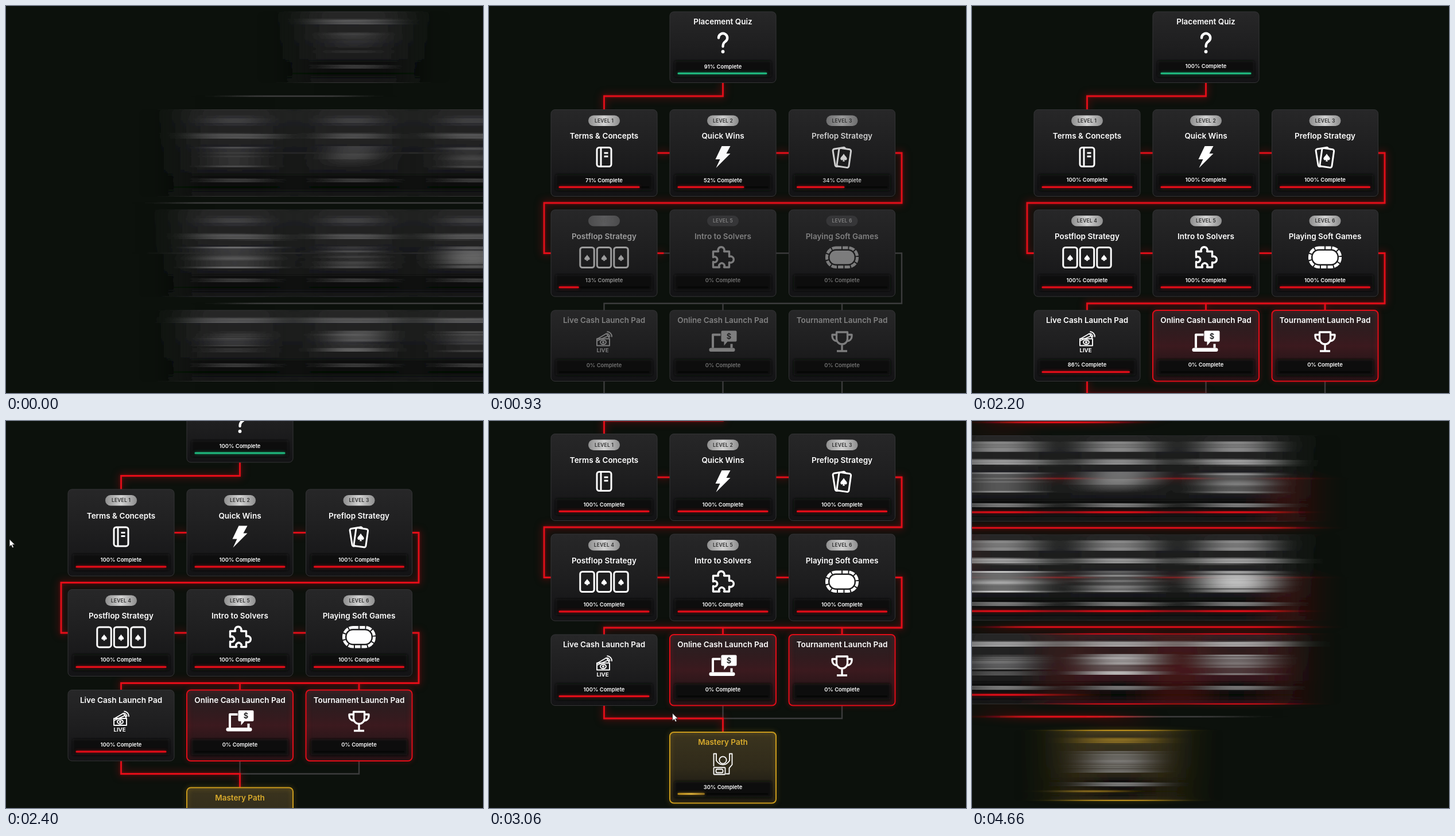
Recreate the animation shown at these times as an HTML page. Size 831x674 px, loop 4.73 s.

```html
<!DOCTYPE html>
<html lang="en">
<head>
<meta charset="utf-8">
<title>Learning path</title>
<style>
html, body { margin: 0; width: 100%; height: 100%; overflow: hidden; background: #0c110c; }
svg { display: block; width: 100vw; height: 100vh; font-family: Inter, sans-serif; font-weight: 600; }
text { text-anchor: middle; fill: #fff; }
.title { font-size: 13.5px; }
.percent { font-size: 9.4px; }
.badge { font-size: 8.5px; letter-spacing: .2px; }
.icon { fill: none; stroke: #fff; stroke-width: 3; stroke-linejoin: round; }
.solid { fill: #fff; stroke: none; }
.dark { fill: #1c1c1d; stroke: none; }
.link { fill: none; stroke: #3c3c3d; stroke-width: 2.4; }
#lit { filter: drop-shadow(0 0 2px #b0081090) drop-shadow(0 0 7px #b80812b0); }
#lit .link { stroke: #e40d18; stroke-width: 2.8; }
</style>
</head>
<body>
<svg id="stage" viewBox="0 0 831 674" preserveAspectRatio="none"></svg>
<script>
const LOOP = 4730;
const RED = '#e00d18', GREEN = '#1fb57c', GOLD = '#c99a1c';
const COLUMNS = [200.5, 407.5, 615];

const spade = (x, y, s) => `<path class="solid" transform="translate(${x} ${y}) scale(${s})"
  d="M0-7C2-3 6-1 6 2.5A3 3 0 0 1 1 4L2 7H-2L-1 4A3 3 0 0 1-6 2.5C-6-1-2-3 0-7Z"/>`;

const icons = {
  question: `<path stroke-width="4.4" stroke-linecap="round" d="M-7.5-9A7.6 7.6 0 1 1 4-2.5C1-.5 0 1.5 0 6"/>
    <circle class="solid" cy="15" r="2.9"/>`,
  book: `<rect x="-12.5" y="-16.5" width="25" height="33" rx="4"/><path d="M-5.5-16V16M0-7H7M0-1H7"/>`,
  bolt: `<path class="solid" d="M-2-19H13L6-6H13L-12 19-5 4H-13Z"/>`,
  pair: `<rect x="-14" y="-16" width="22" height="31" rx="3" transform="rotate(-9)"/>
    <rect x="-7" y="-15" width="21" height="32" rx="3" fill="#1c1c1d" transform="rotate(8)"/>${spade(3, 1, .95)}`,
  flop: [-29.5, 0, 29.5].map(x =>
    `<rect x="${x - 12.2}" y="-17" width="24.4" height="35" rx="4"/>${spade(x, 1, .8)}`).join(''),
  puzzle: `<path stroke-width="3.4" d="M-17-10H-8A5.5 5.5 0 1 1 2-10H11V-1A5.5 5.5 0 1 1 11 9V17.5
    H2A4.7 4.7 0 1 0-6 17.5H-17V8A4.7 4.7 0 1 0-17 0Z"/>`,
  table: `<rect x="-26.5" y="-16.5" width="53" height="33.5" rx="16" stroke-width="5" stroke-dasharray="9.5 2"/>
    <rect class="solid" x="-21.5" y="-11.5" width="43" height="23.5" rx="11"/>`,
  live: `<g stroke-width="1.9"><path d="M-13-4L4-14 9-7"/><path d="M-13-1L7-10 9-6"/>
    <rect x="-12.5" y="-5" width="22" height="12"/><ellipse cx="-1.5" cy="1" rx="5" ry="3.7"/>
    <circle class="solid" cx="-1.5" cy="1" r="2"/><path d="M5-14A6 6 0 0 1 10-8M5-17.5A9 9 0 0 1 13.5-8"/></g>
    <text x="-2.5" y="18.5" font-size="9.6" font-weight="700" stroke="none">LIVE</text>`,
  laptop: `<path stroke-width="4" d="M-4-12H-17.5V11M15 4V11"/>
    <rect class="solid" x="-24" y="11" width="45" height="6.5" rx="3"/>
    <path class="solid" d="M-1-19H22a2 2 0 0 1 2 2V-2a2 2 0 0 1-2 2H8L2 7V0H-1a2 2 0 0 1-2-2V-17a2 2 0 0 1 2-2Z"/>
    <text class="dark" x="10.5" y="-4.5" font-size="13">$</text>`,
  trophy: `<path stroke-width="3.3" d="M-9.5-16.5H9.5V-5A9.5 9.5 0 0 1-9.5-5ZM-10-12H-17V-9
    A8 8 0 0 0-8.5-1M10-12H17V-9A8 8 0 0 1 8.5-1M0 4V16M-9 16.5H9"/>`,
  winner: `<g stroke-width="1.8"><path d="M-16 5V-17H-11.5V-5Q-7 2 0 2T11.5-5V-17H16V2L11 8V18H5"/>
    <circle cy="-6" r="6.2"/><rect x="-16" y="7" width="20" height="12" rx="1"/>
    <rect x="-12" y="10" width="12" height="6" rx="2"/></g>`
};

// start: when the card wakes up; goal: percentage it climbs to
const card = (title, icon, column, top, start, more) =>
  ({ title, icon, x: COLUMNS[column], top, start, goal: 100, height: 123.5, color: RED, ...more });
const level = n => ({ level: n, height: 151 });
const cards = [
  card('Placement Quiz', 'question', 1, 10, 20, { color: GREEN }),
  card('Terms & Concepts', 'book', 0, 180.5, 220, level(1)),
  card('Quick Wins', 'bolt', 1, 180.5, 410, level(2)),
  card('Preflop Strategy', 'pair', 2, 180.5, 590, level(3)),
  card('Postflop Strategy', 'flop', 0, 355, 800, level(4)),
  card('Intro to Solvers', 'puzzle', 1, 355, 960, level(5)),
  card('Playing Soft Games', 'table', 2, 355, 1190, level(6)),
  card('Live Cash Launch Pad', 'live', 0, 530, 1340),
  card('Online Cash Launch Pad', 'laptop', 1, 530, 1340, { goal: 0, frame: 'red' }),
  card('Tournament Launch Pad', 'trophy', 2, 530, 1340, { goal: 0, frame: 'red' }),
  card('Mastery Path', 'winner', 1, 700, 1560, { goal: 30, frame: 'gold', color: GOLD })
];
const mastery = cards[cards.length - 1];

// [path, begin, end]; links without times never light up
const links = [
  ['M407.5 133V157H200.5V181', 60, 220],
  ['M293 256H315', 350, 410],
  ['M500 256H522', 530, 590],
  ['M707 256H719V343H96V430.5H108', 610, 800],
  ['M293 430.5H315', 900, 960],
  ['M500 430.5H522', 1130, 1190],
  ['M707 430.5H719V518H200.5V530', 1210, 1360],
  ['M615 518V530', 1250, 1290],
  ['M407.5 518V530', 1300, 1340],
  ['M407.5 653V700'],
  ['M615 653V676H407.5'],
  ['M200.5 653V676H407.5V700', 1460, 1580]
];

const clamp = v => Math.max(0, Math.min(1, v));
const span = (t, a, b) => clamp((t - a) / (b - a));
const smooth = u => u * u * (3 - 2 * u);
const mix = (a, b, u) => a + (b - a) * u;

const gradient = (id, stops, vertical = 1) =>
  `<linearGradient id="${id}" x2="${1 - vertical}" y2="${vertical}">${stops.map((c, i) =>
    `<stop offset="${i / (stops.length - 1)}" stop-color="${c}"/>`).join('')}</linearGradient>`;

function cardMarkup(c) {
  const { x, top, height: h, level } = c, left = x - 92.5, bottom = top + h;
  const gold = c.frame === 'gold', edge = gold ? GOLD : RED;
  const box = `x="${left}" y="${top}" width="185" height="${h}" rx="7"`;
  return `<g class="card">
    <rect ${box} fill="url(#face)" stroke="#343436"/>
    ${c.frame ? `<g class="frame"><rect ${box} fill="url(#${c.frame})"/>
      <rect ${box} fill="none" stroke="${edge}" stroke-width="2"
        style="filter:drop-shadow(0 0 4px ${edge}90)"/></g>` : ''}
    <rect x="${left + 8}" y="${bottom - 38}" width="169" height="28" rx="3" fill="#0b0e0b" filter="url(#soft)"/>
    <rect x="${x - 79}" y="${bottom - 17.5}" width="158" height="3" rx="1.5" fill="#060706"/>
    <rect class="bar" x="${x - 79}" y="${bottom - 17.7}" height="3.2" rx="1.5"
      fill="${gold ? 'url(#coin)' : c.color}" style="filter:drop-shadow(0 0 2.5px ${c.color}90)"/>
    ${level ? `<rect x="${x - 27.5}" y="${top + 10}" width="55" height="18.5" rx="9.2" fill="#363638"/>
      <rect class="shine" x="${x - 27.5}" y="${top + 10}" width="55" height="18.5" rx="9.2" fill="url(#silver)"/>
      <text class="badge" x="${x}" y="${top + 22.2}">LEVEL ${level}</text>` : ''}
    <g class="content">
      <text class="title" x="${x}" y="${top + (level ? 50.7 : 22.3)}"
        ${gold ? 'style="fill:#d9ab2c"' : ''}>${c.title.replace('&', '&amp;')}</text>
      <g class="icon" transform="translate(${x} ${top + (level ? 82.5 : 54.5)})">${icons[c.icon]}</g>
      <text class="percent" x="${x}" y="${bottom - 25}"></text>
    </g></g>`;
}

const linkMarkup = ([d]) => `<path class="link" pathLength="1" d="${d}"/>`;
const litLinks = links.filter(l => l[1]);
const stage = document.getElementById('stage');
stage.innerHTML = `<defs>
    ${gradient('face', ['#272728', '#1e1e1f', '#131315'])}
    ${gradient('red', ['#30151840', '#45181ec0', '#20101280'])}
    ${gradient('gold', ['#443a1ab0', '#383018b0', '#1c180c60'])}
    ${gradient('silver', ['#8e8e8e', '#d2d2d2', '#8e8e8e'], 0)}
    ${gradient('coin', ['#b08418', '#d9ad38', '#8a681c'], 0)}
    <filter id="soft"><feGaussianBlur stdDeviation="2"/></filter>
    <filter id="whip" filterUnits="userSpaceOnUse" x="-300" y="-20" width="1500" height="900"
      color-interpolation-filters="linearRGB"><feGaussianBlur id="whipBlur" stdDeviation="0"/></filter>
  </defs>
  <g id="view"><g id="slide">
    <g id="page">
      <g>${links.map(linkMarkup).join('')}</g>
      <g id="lit">${litLinks.map(linkMarkup).join('')}</g>
      ${cards.map(cardMarkup).join('')}
    </g>
    <g id="cursor" stroke="#222" stroke-width=".9" fill="#fff">
      <path id="arrow" d="M0 0V13L3 10.3 5 15 7.3 14 5.3 9.5H9.5Z"/>
      <path id="hand" d="M0 8V1.5a1.5 1.5 0 0 1 3 0V6l6 1.5q1.5.5 1.2 2L9 14q-.3 1.5-2 1.5H2.5Q1 15.5 0 14L-3.5 9.5q0-2 3.5-1.5Z"/>
    </g>
  </g></g>`;

const el = id => document.getElementById(id);
const litPaths = [...el('lit').children];
document.querySelectorAll('.card').forEach((node, i) => {
  cards[i].node = node;
  for (const part of ['bar', 'shine', 'badge', 'content', 'percent', 'frame'])
    cards[i][part + 'El'] = node.querySelector('.' + part);
});

function drawCard(c, t) {
  const p = span(t, c.start, c.start + 1000), awake = clamp(p / .54);
  c.percentEl.textContent = `${Math.round(p * c.goal)}% Complete`;
  c.barEl.setAttribute('width', 1.58 * c.goal * (1 - (1 - p) ** 1.8));
  c.contentEl.style.opacity = mix(.42, 1, awake);
  if (c.frame) c.frameEl.style.opacity = awake;
  if (c.level) {
    const tone = mix(128, 44, clamp(awake * 2));
    c.shineEl.style.opacity = awake;
    c.badgeEl.style.fill = `rgb(${tone},${tone},${tone})`;
  }
}

// The page whips in from the right and out to the left; blur follows its speed
function drawWhip(t) {
  const enter = 1 - span(t, 0, 305), leave = Math.max(0, (t - 4460) / 200);
  const x = 200 * enter ** 3 - 150 * leave ** 3;
  const blur = 31 * enter ** 2 + 37 * leave ** 2;
  const scale = 1 - .012 * leave ** 3;
  el('slide').setAttribute('transform',
    `translate(${x} 0) translate(407 272) scale(${scale}) translate(-407 -272)`);
  el('whipBlur').setAttribute('stdDeviation', `${blur} 0`);
  el('view').setAttribute('filter', blur > .2 ? 'url(#whip)' : 'none');
}

function drawCursor(t) {
  const p = smooth(span(t, 2200, 3400)), over = p > .87;
  el('cursor').setAttribute('transform', `translate(${mix(-26, 403, p)} ${mix(174, 587, p) + 14 * p * (1 - p)})`);
  el('arrow').style.display = p && !over ? '' : 'none';
  el('hand').style.display = over ? '' : 'none';
}

function draw(t) {
  cards.forEach(c => drawCard(c, t));
  litLinks.forEach(([, begin, end], i) => {
    const p = span(t, begin, end);
    litPaths[i].style.display = p ? '' : 'none';
    litPaths[i].setAttribute('stroke-dasharray', `${p} 2`);
  });
  const scroll = 158 * smooth(1 - (1 - span(t, 2200, 3030)) ** 2);
  el('page').setAttribute('transform', `translate(0 ${-scroll})`);
  const press = Math.sin(Math.PI * span(t, 3800, 4350));
  mastery.node.setAttribute('transform',
    `translate(407.5 762) scale(${1 - .008 * press}) translate(-407.5 -762)`);
  drawCursor(t);
  drawWhip(t);
}

const origin = performance.now();
(function tick() {
  draw((performance.now() - origin) % LOOP);
  requestAnimationFrame(tick);
})();
</script>
</body>
</html>
```
